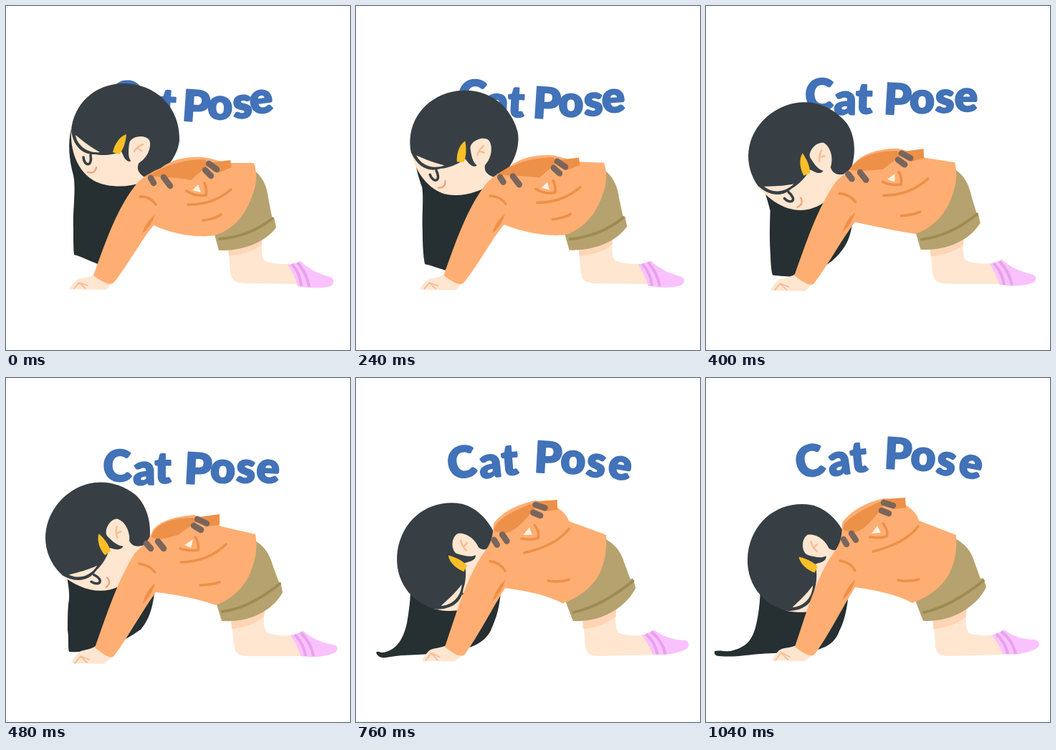
Write an HTML page with a canvas that moves like this. It is 480 px wide and 480 px high and loops after 6.72 s.

```html
<!DOCTYPE html>
<html lang="en">
<head>
<meta charset="utf-8">
<title>Cat Pose</title>
<style>
html, body { margin: 0; width: 100%; height: 100%; overflow: hidden; background: #fff; }
canvas { display: block; width: 100vw; height: 100vh; }
</style>
</head>
<body>
<canvas id="stage" width="480" height="480"></canvas>
<script>
const ctx = document.getElementById('stage').getContext('2d');
const LOOP = 6720, STEP = 40, MOVE_END = 1040;
const TIMES = [0, 160, 320, 480, 600, 760, 1040];
const COLOR = {
  text: '#4272b8', hair: '#373f44', backHair: '#262f32', skin: '#ffe6d0', blush: '#ffd5b5',
  line: '#f6bd98', mouth: '#f3a077', clip: '#f9be28', sweater: '#ffae73', fold: '#ed9048',
  stripe: '#7a655b', shorts: '#b5a26e', seam: '#9d8b51', sock: '#fac1ff', band: '#e8a2ea'
};

// Motion curves, one value per entry of TIMES
const TRACK = {
  body: [0, .06, .3, 1, 1.42, 1.87, 2],
  title: [0, .2, .47, 1, 1.25, 1.75, 2],
  hair: [0, .25, 1, 2, 3, 4, 5],
  headX: [184, 180, 166, 156, 152.5, 152, 152.5],
  headY: [200, 203, 206, 217, 223.5, 235, 236.5],
  headTurn: [0, -6.5, -27.5, -53, -71, -81, -82]
};

// Each letter: glyph, centre x, baseline y and tilt at the start, middle and end
const LETTERS = [
  ['C', [163, 156, 149], [148, 144, 137], [6, -2, -12]],
  ['a', [197, 193, 188], [157, 149, 135], [6, -1, -8]],
  ['t', [224, 219, 215], [158, 147, 131], [4, 0, -6]],
  ['P', [264, 267, 267], [161, 148, 127], [4, 3, 3]],
  ['o', [299, 302, 302], [158, 146, 129], [-1, 2, 4]],
  ['s', [331, 334, 333], [156, 146, 135], [-4, 2, 8]],
  ['e', [358, 364.5, 366], [149, 146, 139], [-7, 4, 11]]
];

const BACK_HAIR = [
  'M91 172 C86 190 88 215 94 236 C98 255 93 285 94 310 C94 325 94 340 95 347 C104 349 115 355 128 360 C150 360 165 340 175 325 C185 310 192 295 195 230Z',
  'M74 222 C78 240 86 255 91 266 C92 280 91 295 92 318 C92 340 94 358 97 370 C106 371 115 375 126 376 C160 372 178 353 186 339 C198 325 205 315 208 240Z',
  'M84 270 C86 285 89 297 88 309 C86 320 86 335 86 352 C88 365 86 376 88 382 C100 383 110 381 124 380 C160 372 180 356 188 351 C202 334 208 315 210 260Z',
  'M84 280 C85 300 84 314 82 327 C78 345 80 366 75 376 C72 378 70 374 66 374 C64 377 70 384 74 386 C90 382 105 384 124 382 C160 376 180 364 189 349 C201 330 207 312 208 260Z',
  'M76 275 C77 300 75 320 71 342 C66 365 56 380 38 383 C34 384 31 380 28 383 C30 389 35 391 42 390 C68 385 95 387 124 383 C164 379 182 367 189 350 C199 328 203 310 204 260Z',
  'M75 275 C77 305 74 327 70 344 C65 366 56 375 38 380 C30 383 20 379 12 381 C11 385 13 388 18 388 C50 391 65 382 124 384 C162 381 179 373 186 353 C195 335 200 312 201 260Z'
];

const SHAPE = {
  leg: [
    'M309 322 L357 315 C357 340 356 350 361 355 C371 360 385 360 397 360 L408 388 L336 387 C322 387 314 383 313 372Z',
    'M313 322 L361 315 C359 340 360 351 364 355 C376 360 390 360 401 358 L412 388 L338 388 C324 388 319 383 318 372Z',
    'M316 322 L362 315 C362 340 363 352 367 356 C378 360 392 360 404 358 L416 386 L340 388 C326 388 321 385 320 372Z'],
  shade: [
    'M309 325 L358 315 L357 333 C345 343 325 348 311 348Z',
    'M313 325 L362 315 L360 333 C348 344 328 349 315 350Z',
    'M316 325 L364 315 L363 333 C350 344 330 350 317 350Z'],
  sock: [
    'M393 361 C400 360 406 358 411 356 C422 367 437 374 452 378 C460 381 458 389 452 391 C437 395 420 393 407 391 C404 380 399 370 393 361Z',
    'M397 359 C404 358 410 355 414 353 C427 363 441 370 457 372 C464 374 464 381 457 384 C442 390 425 390 411 388 C408 377 403 368 397 359Z',
    'M399 359 C406 357 411 354 416 351 C428 361 443 365 459 365 C467 367 466 375 460 378 C446 385 429 387 414 385 C410 374 405 367 399 359Z'],
  bands: [
    'M399 360 Q411 374 412 391 M407 358 Q420 374 423 392',
    'M403 358 Q416 372 418 388 M411 355 Q426 370 429 388',
    'M405 357 Q418 369 421 385 M412 354 Q428 366 432 385'],
  hand: [
    'M124 374 C115 380 105 379 99 382 C95 386 91 390 88 395 L140 396 L147 387Z',
    'M125 374 C116 380 106 379 101 383 C97 388 93 393 91 398 L137 399 L149 388Z',
    'M126 373 C117 377 107 376 102 380 C97 385 94 390 92 394 L137 395 L150 386Z'],
  fingers: [
    'M95 394 L102 386 L111 394 M102 386 L114 390',
    'M96 398 L104 388 L113 397 M104 388 L116 393',
    'M97 394 L105 383 L114 393 M105 383 L117 389'],
  shorts: [
    'M344 228 C357 236 364 250 366 268 L371 294 L374 295 L377 309 C364 327 335 342 297 341 L291 319 L310 280Z',
    'M344 225 C362 234 369 249 373 264 L381 285 L383 285 L386 299 C374 322 343 342 301 339 L294 316 L315 275Z',
    'M344 222 C364 232 371 244 375 258 L383 280 L387 279 L391 292 C378 318 345 341 303 339 L293 313 L315 270Z'],
  seam: [
    'M298 325 C325 323 348 315 371 297',
    'M302 326 C330 322 355 309 382 287',
    'M304 327 C332 321 358 306 387 283'],
  sweater: [
    'M184 246 C194 236 205 231 216 226 C235 212 255 210 275 211 C285 212 295 216 310 219 L346 219 C351 235 350 250 343 266 C335 290 317 313 291 320 C265 324 232 318 206 306 C189 326 171 360 152 384 C148 390 141 390 122 376 C138 332 155 280 184 246Z',
    'M180 244 C190 234 198 230 205 212 C216 198 240 193 262 191 C277 195 291 201 300 207 L348 218 C351 233 349 250 344 263 C337 287 319 307 293 317 C270 309 240 302 209 299 C190 325 170 362 152 386 C149 392 142 391 124 376 C140 332 155 283 180 244Z',
    'M178 244 C186 233 190 225 190 202 C201 186 222 174 248 168 C278 171 294 186 297 199 L349 219 C350 233 349 249 344 262 C337 285 317 303 288 314 C265 301 235 296 208 292 C191 319 170 361 152 385 C149 389 142 389 124 375 C139 332 153 279 178 244Z'],
  hood: [
    'M195 237 C215 229 235 214 278 214 L282 222 L258 243 C240 239 215 239 195 237Z',
    'M203 223 C205 205 230 195 260 195 L268 199 L240 219 C225 223 215 227 203 223Z',
    'M191 211 C190 199 220 182 245 172 L247 181 L227 203 C218 212 206 221 191 211Z'],
  tip: [
    'M281 219 L313 215 L315 225 L296 233Z',
    'M269 194 L298 190 L298 205 L281 207Z',
    'M246 169 L278 167 L279 181 L262 183Z'],
  stripes: [
    'M202 240 L206 247 M220 239 L229 251 M283 220 L294 228 M278 229 L286 237',
    'M196 231 L202 238 M212 228 L220 238 M267 197 L280 203 M262 206 L272 212',
    'M192 225 L196 232 M203 217 L209 226 M248 174 L261 178 M245 185 L255 189'],
  folds: [
    'M252 258 Q263 266 279 264 Q281 256 277 247 M254 277 Q288 278 314 256 M275 299 Q289 298 300 291 M187 266 Q200 265 209 277',
    'M243 238 Q255 242 268 240 Q270 230 264 222 M244 257 Q283 256 307 232 M271 289 Q285 289 298 285 M186 259 Q200 261 208 271',
    'M229 222 Q242 224 252 221 Q255 213 247 203 M233 242 Q278 231 296 207 M268 282 Q283 285 297 281 M187 255 Q202 257 208 269'],
  elbow: [
    'M208 291 Q203 307 190 318 Q194 302 208 291Z',
    'M208 286 Q205 301 191 315 Q194 298 208 286Z',
    'M208 281 Q205 297 190 311 Q195 293 208 281Z'],
  patch: [
    'M268 249 L260 257 L272 260Z',
    'M261 225 L249 233 L258 237Z',
    'M239 206 L231 217 L244 216Z']
};

const mix = (a, b, k) => a + (b - a) * k;

// Smooth curve through the values at TIMES, at rest at both ends
function follow(values, time) {
  const last = TIMES.length - 1;
  let i = 0;
  while (i < last - 1 && time > TIMES[i + 1]) i++;
  const slope = j => j === 0 || j === last ? 0 :
    (values[j + 1] - values[j - 1]) / (TIMES[j + 1] - TIMES[j - 1]);
  const span = TIMES[i + 1] - TIMES[i], k = (time - TIMES[i]) / span, r = 1 - k;
  return r * r * (1 + 2 * k) * values[i] + k * k * (3 - 2 * k) * values[i + 1] +
    span * k * r * (r * slope(i) - k * slope(i + 1));
}

function between(keys, pos) {
  const i = Math.max(0, Math.min(keys.length - 2, Math.floor(pos)));
  return [keys[i], keys[i + 1], pos - i];
}

const blend = (keys, pos) => mix(...between(keys, pos));

function morph(keys, pos) {
  const [from, to, k] = between(keys, pos);
  const goals = to.match(/[\d.]+/g);
  let n = 0;
  return from.replace(/[\d.]+/g, v => mix(+v, +goals[n++], k).toFixed(2));
}

function fill(path, color) {
  ctx.fillStyle = color;
  ctx.fill(new Path2D(path));
}

function line(path, color, width, cap = 'round') {
  ctx.strokeStyle = color;
  ctx.lineWidth = width;
  ctx.lineCap = cap;
  ctx.stroke(new Path2D(path));
}

function drawTitle(pos) {
  ctx.font = '900 60px Lato, sans-serif';
  ctx.textAlign = 'center';
  ctx.fillStyle = ctx.strokeStyle = COLOR.text;
  ctx.lineWidth = 2;
  for (const [glyph, xs, ys, tilts] of LETTERS) {
    ctx.save();
    ctx.translate(blend(xs, pos), blend(ys, pos));
    ctx.rotate(blend(tilts, pos) * Math.PI / 180);
    ctx.fillText(glyph, 0, 0);
    ctx.strokeText(glyph, 0, 0);
    ctx.restore();
  }
}

// The head is rigid and turns about the ear
function drawHead(time) {
  ctx.save();
  ctx.translate(follow(TRACK.headX, time), follow(TRACK.headY, time));
  ctx.rotate(follow(TRACK.headTurn, time) * Math.PI / 180);
  ctx.translate(-184, -200);
  fill('M91 172 C89 200 99 232 125 245 C145 254 170 253 192 246 L200 215 L160 180Z', COLOR.skin);
  fill('M91 174 C94 138 122 109 163 108 C210 108 243 142 242 187 C240 208 225 228 205 240 L192 238 C181 230 182 222 190 212 L172 217 C165 216 163 206 161 203 C150 208 135 209 125 207 C106 208 94 195 91 174Z', COLOR.hair);
  fill('M97 180 C108 189 118 197 131 204 C112 206 99 193 97 180Z', COLOR.skin);
  fill('M168 179 C158 182 151 194 149 204 L158 207 C164 200 167 190 168 179Z', COLOR.clip);
  fill('M172 192 C173 182 193 178 200 187 C204 197 197 214 182 221 C170 218 170 206 172 192Z', COLOR.skin);
  line('M179 203 Q183 196 191 193 M183 198 L189 202', COLOR.line, 2.5);
  line('M108 211 C109 224 121 225 118 208', COLOR.hair, 3.5);
  line('M114 232 Q124 235 126 225', COLOR.mouth, 2.2);
  ctx.restore();
}

function drawBody(pos) {
  const part = name => morph(SHAPE[name], pos);
  fill(part('leg'), COLOR.skin);
  fill(part('shade'), COLOR.blush);
  fill(part('sock'), COLOR.sock);
  line(part('bands'), COLOR.band, 4, 'butt');
  fill(part('hand'), COLOR.skin);
  line(part('fingers'), COLOR.line, 1.8);
  fill(part('shorts'), COLOR.shorts);
  line(part('seam'), COLOR.seam, 4);
  fill(part('sweater'), COLOR.sweater);
  fill(part('hood'), COLOR.fold);
  fill(part('tip'), COLOR.fold);
  line(part('stripes'), COLOR.stripe, 8.5);
  line(part('folds'), COLOR.fold, 3.6);
  fill(part('elbow'), COLOR.fold);
  fill(part('patch'), '#fff3df');
}

function draw(now) {
  const time = Math.min(MOVE_END, Math.floor(now % LOOP / STEP) * STEP);
  ctx.fillStyle = '#fff';
  ctx.fillRect(0, 0, 480, 480);
  ctx.lineJoin = 'round';
  drawTitle(follow(TRACK.title, time));
  fill(morph(BACK_HAIR, follow(TRACK.hair, time)), COLOR.backHair);
  drawHead(time);
  drawBody(follow(TRACK.body, time));
  requestAnimationFrame(draw);
}
draw(performance.now());
</script>
</body>
</html>
```
